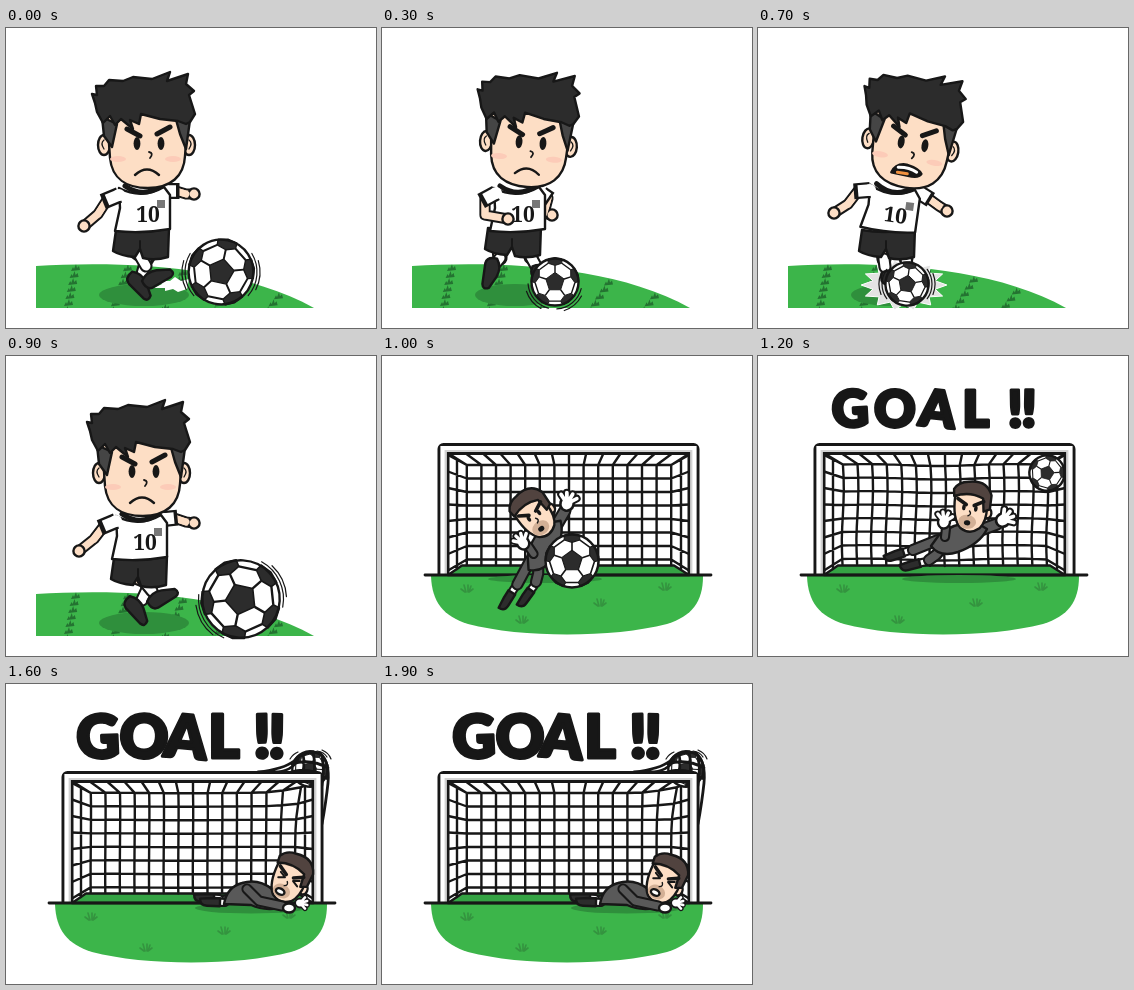
An HTML page for the animation above (2000 ms loop, 370 by 300 pixels).

```html
<!DOCTYPE html>
<html lang="en">
<head>
<meta charset="utf-8">
<title>Goal</title>
<style>
html, body { margin: 0; width: 100%; height: 100%; overflow: hidden; background: #fff; }
svg { display: block; width: 370px; height: 300px; }
.line { fill: none; stroke-linecap: round; stroke-linejoin: round; }
.ink { stroke: #171717; stroke-width: 2.4; stroke-linejoin: round; }
.shirt-number { font: 900 21px "Noto Serif", serif; text-anchor: middle; fill: #171717; }
.shout { font-family: Lato, sans-serif; font-weight: 900; text-anchor: middle; fill: #171717; stroke: #171717; stroke-width: 3; stroke-linejoin: round; }
</style>
</head>
<body>
<svg id="stage" viewBox="0 0 370 300"></svg>
<script>
const INK = '#171717', DARK = '#2c2c2c', SKIN = '#fddec5', GRASS = '#3cb54a', SHADE = '#2f8f3c', SUIT = '#595959';
const stage = document.getElementById('stage');

const mix = (a, b, k) => Object.fromEntries(Object.keys(a).map(key =>
  [key, a[key].map((v, i) => v + (b[key][i] - v) * k)]));
const shape = (d, fill) => `<path class="ink" d="${d}" fill="${fill}"/>`;
const stroke = (d, color = INK, width = 2) => `<path class="line" d="${d}" stroke="${color}" stroke-width="${width}"/>`;
const oval = (x, y, rx, ry, fill, extra = '') => `<ellipse cx="${x}" cy="${y}" rx="${rx}" ry="${ry}" fill="${fill}" ${extra}/>`;
const group = (transform, content) => `<g transform="${transform}">${content}</g>`;
const move = ([x, y, turn = 0], cx, cy) => `translate(${x} ${y}) rotate(${turn} ${cx} ${cy})`;
const place = (x, y, turn, content) => group(`translate(${x} ${y}) rotate(${turn})`, content);
const limb = (points, color, width) => {
  const d = 'M' + points.join(' ');
  return stroke(d, INK, width + 4.2) + stroke(d, color, width);
};
const polar = (r, deg) => [r * Math.cos(deg * Math.PI / 180), r * Math.sin(deg * Math.PI / 180)].map(v => v.toFixed(3)).join(' ');

// ---------- ball ----------
function ball(x, y, r, turn) {
  let black = '', seams = '';
  const core = [];
  for (let a = -90; a < 270; a += 72) {
    core.push(polar(.4, a));
    black += `M${[polar(.69, a), polar(.83, a + 20), polar(1, a + 17), polar(1.02, a), polar(1, a - 17), polar(.83, a - 20)].join('L')}Z`;
    seams += `M${polar(.4, a)}L${polar(.69, a)}M${polar(.83, a + 20)}L${polar(.83, a + 52)}`;
  }
  return group(`translate(${x} ${y}) rotate(${turn}) scale(${r})`,
    `<circle r="1" fill="#fff"/><path d="M${core.join('L')}Z${black}" fill="${DARK}" stroke="${INK}" stroke-width=".04" stroke-linejoin="round"/>
     <path d="${seams}" stroke="${INK}" stroke-width=".06"/><circle r=".98" fill="none" stroke="${INK}" stroke-width="${2.4 / r}"/>`);
}
function whoosh(x, y, r, angles, span = 36) {
  return angles.map(a => [3, 6].map((gap, i) => {
    const part = span - i * 14, R = r + gap;
    return place(x, y, 0, stroke(`M${polar(R, a - part)}A${R} ${R} 0 0 1 ${polar(R, a + part)}`, INK, 1.2));
  }).join('')).join('');
}

// ---------- player ----------
// arms: shoulder, cuff, elbow, hand; legs: hip, sock top, sock end, shoe, shoe angle
const kick = {
  head: [0, 0, 0], shirt: [0, 0, 0], shorts: [0, 0],
  left: [113, 167, 101, 172, 92, 186, 78, 198], right: [160, 163, 170, 163, 180, 166, 188, 166],
  back: [146, 222, 140, 232, 136, 246, 134, 257, 45], front: [122, 218, 133, 226, 140, 238, 151, 249, -30],
  ball: [215, 244, 33, 12], shadow: [138, 267, 45]
};
const follow = {
  head: [-5, 0, 0], shirt: [-3, 0, 0], shorts: [-2, 0],
  left: [110, 165, 98, 170, 88, 183, 73, 195], right: [158, 163, 168, 162, 180, 166, 188, 167],
  back: [142, 222, 142, 231, 136, 244, 131, 254, 47], front: [122, 218, 137, 224, 146, 235, 156, 241, -32],
  ball: [235, 243, 39.5, 48], shadow: [138, 267, 45]
};
const run = {
  head: [6, -1, 4], shirt: [-1, 0, 0], shorts: [-4, -2],
  left: [114, 165, 103, 171, 103, 187, 126, 191], right: [160, 166, 166, 170, 162, 185, 170, 187],
  back: [117, 220, 118, 230, 114, 235, 109, 245, 98], front: [148, 222, 149, 229, 154, 238, 164, 246, 15],
  ball: [173, 254, 24, 0], shadow: [133, 267, 40]
};
const strike = {
  head: [12, 0, 9], shirt: [-4, 0, 8], shorts: [-6, 0],
  left: [112, 162, 100, 163, 90, 176, 76, 185], right: [162, 165, 170, 170, 181, 178, 189, 183],
  back: [125, 222, 126, 231, 127, 239, 138, 251, 10], front: [147, 222, 148, 230, 149, 238, 152, 250, 0],
  ball: [149, 256, 22, 8], shadow: [133, 267, 40]
};
const dribble = [kick, follow, mix(follow, run, .5), run,
  mix(run, strike, .25), mix(run, strike, .5), mix(run, strike, .75), strike];

function arm(p) {
  const [sx, sy, cx, cy, , , hx, hy] = p;
  const cuffEnd = `${cx + (cx - sx) * .35} ${cy + (cy - sy) * .35}`;
  return limb(p.slice(2), SKIN, 7) + oval(hx, hy, 5.6, 5.6, SKIN, 'class="ink"')
    + stroke(`M${p.slice(2, 6).join(' ')}`, SKIN, 7)
    + `<path d="M${sx} ${sy}L${cuffEnd}" stroke="${INK}" stroke-width="16"/>`
    + `<path d="M${sx} ${sy}L${cx} ${cy}" stroke="#fff" stroke-width="11.5"/>` + oval(sx, sy, 6, 6, '#fff');
}
function leg(p) {
  return limb(p.slice(0, 4), SKIN, 11) + limb(p.slice(2, 6), '#fff', 9)
    + place(p[6], p[7], p[8], shape('M-15-4Q-16 6-9 7L12 7Q18 6 15 0L3-6Q-7-10-15-4Z', DARK));
}
function head(pose, shouting) {
  const mouth = shouting
    ? shape('M126 147Q129 137 140 137Q153 139 156 144Q154 149 143 148Z', INK)
      + stroke('M132 141Q143 139 151 143', '#fff', 3) + stroke('M132 146L142 146', '#f0913f', 3)
    : stroke('M129 147Q141 136 153 147', INK, 2.4);
  const ears = [98, 183].map((x, i) => oval(x, 117, 6, 10, SKIN, 'class="ink"')
    + stroke(`M${x} 112q${i ? 4 : -4} 3 0 9`, INK, 1.3)).join('');
  return group(move(pose, 141, 116),
    ears + shape('M101 86L104 130C106 151 121 160 142 160C165 160 178 148 179 128L182 86Z', SKIN)
    + shape('M96 89L98 108L106 119L111 96Z', '#454545') + shape('M169 88L174 106L180 121L184 92Z', '#454545')
    + shape('M97 95L91 84L89 75L86 66L91 67L90 58L98 58L103 52L117 53L127 49L146 51L164 44L161 53L182 46L180 56L188 63L183 67L189 86L184 94L180 96L172 93L154 91L135 86L133 96L124 92L127 101L115 91L109 97L104 88Z', DARK)
    + oval(112, 131, 8, 3, '#fccbb8') + oval(167, 131, 8, 3, '#fccbb8')
    + stroke('M121 101L134 108', INK, 5) + stroke('M151 106L164 99', INK, 5)
    + oval(131, 115.5, 3.4, 6.5, INK) + oval(155, 115.5, 3.4, 6.5, INK)
    + stroke('M143 124q5 1 1 6', INK, 1.8) + mouth);
}
function player(pose, shouting) {
  return arm(pose.right) + leg(pose.back) + leg(pose.front)
    + group(move(pose.shorts, 0, 0), shape('M110 202Q136 207 163 200L162 229Q149 233 137 230L134 221L129 229Q115 228 107 223Z', DARK)
      + stroke('M134 213v8', INK, 2))
    + group(move(pose.shirt, 138, 182),
      shape('M113 160Q136 172 158 159L164 167L164 201Q136 206 109 203L114 180Z', '#fff')
      + stroke('M119 158Q138 171 156 157', INK, 5)
      + `<text class="shirt-number" x="142" y="194">10</text><rect x="151" y="172" width="8" height="8" fill="#777"/>`)
    + arm(pose.left) + head(pose.head, shouting);
}

// ---------- pitch ----------
const hill = 'M30 238C110 233 230 236 308 280H30Z';
function pitch(spread) {
  let tufts = '';
  for (const top of [69, 121, 176, 226, 272]) {
    const x0 = 69 + (top - 69) * spread;
    const slope = .2 + (top - 69) * .0028;
    const y0 = 239 + Math.max(0, (x0 - 110) / 200) ** 2 * 43;
    for (let y = y0; y < 282; y += 7)
      tufts += `M${x0 - slope * (y - y0) - 4} ${y + 4}l2-4 1 2 2-5 1 4 2-2 1 4z`;
  }
  return `<clipPath id="hill"><path d="${hill}"/></clipPath><path d="${hill}" fill="${GRASS}"/>
    <path d="${tufts}" fill="#247331" clip-path="url(#hill)"/>`;
}
function burst() {
  const points = [];
  for (let i = 0; i < 28; i++) {
    const a = i / 28 * Math.PI * 2, r = i % 2 ? .76 : 1.02;
    points.push(`${146 + 42 * r * Math.cos(a)},${257 + 25 * r * Math.sin(a)}`);
  }
  return `<polygon points="${points.join(' ')}" fill="#e3e3e3" stroke="#fff"/>`;
}
function dribbleScene(step) {
  const pose = dribble[step], [x, y, r] = pose.ball, [sx, sy, srx] = pose.shadow;
  const splash = step ? '' : '<path d="M148 260l8-4-3-3 11 0 5-4 6 4 8-2-2 10-9 3-5-3-8 2 0-3z" fill="#fff"/>';
  const arcs = [[175, 5], [150, -25], [150, -25], [140, 50], [140, 50], [140, 50], [140, 50], [0, 180]][step];
  return pitch(1 - .07 * Math.max(0, step - 3) / 4) + oval(sx, sy, srx, 11, SHADE)
    + splash + (step === 7 ? burst() : '') + player(pose, step === 7)
    + whoosh(x, y, r, arcs) + ball(...pose.ball);
}

// ---------- goal ----------
function net(pull, shake) {
  const at = (x, y) => {
    const w = Math.exp(-((x - 300) ** 2 + (y - 100) ** 2) / 600) * pull;
    return `${(x + 8 * w + shake * Math.sin(y / 17)).toFixed(1)} ${(y - 8 * w + shake * Math.sin(x / 23)).toFixed(1)}`;
  };
  const columns = Array.from({ length: 15 }, (_, i) => 187 + (i - 7) * 14.6);
  let d = '';
  for (let i = 0; i < 8; i++) {
    const y = 109 + i * 13.5, front = 99 + i * 16.5;
    d += `M66 ${front}L${columns.map(x => at(x, y)).join('L')}L307 ${front}`;
  }
  for (const x of columns) {
    d += `M${187 + (x - 187) * 1.17} 98`;
    for (let y = 109; y <= 209; y += 12.5) d += 'L' + at(x, y);
  }
  return stroke(d + 'M75 104V213M299 104V213', INK, 2.4);
}
function frame() {
  const d = 'M61.5 219V93H311.5V219';
  return `<path d="${d}" fill="none" stroke-linejoin="round" stroke="${INK}" stroke-width="12"/>
    <path d="${d}" fill="none" stroke="#fff" stroke-width="6.2"/>
    <path d="M63.6 219V95.1H309.4V219" fill="none" stroke="#d2d2d2" stroke-width="2"/>`;
}
const tuft = (x, y) => stroke(`M${x - 6} ${y}l4 3M${x - 3} ${y - 4}l2 7M${x + 1} ${y - 4}v7M${x + 4} ${y - 3}l-2 6M${x + 6} ${y}l-4 3`, '#34933f', 1.6);
function glove(x, y, turn, size) {
  const fingers = [-48, -16, 16, 48].map(a => 'M0 0L' + polar(10, a)).join('');
  return group(`translate(${x} ${y}) rotate(${turn}) scale(${size})`,
    stroke(fingers, INK, 7) + oval(0, 0, 6.5, 6, '#fff', 'class="ink"') + stroke(fingers, '#fff', 3.4));
}
function boot(x, y, turn) {
  return place(x, y, turn, limb([13, 0, 9, 0], '#fff', 5) + shape('M-12-3Q-12 4-5 4L8 4L8-4L0-4Z', DARK));
}
function keeperHead(x, y, turn, down) {
  const face = down
    ? stroke('M-10-2L-4 1L-10 4M11-2L5 1L11 4', INK, 2) + oval(-2, 16, 4.5, 3, '#fff', 'class="ink"')
    : oval(-6, 1, 1.8, 3, INK) + oval(6, 1, 1.8, 3, INK) + oval(-1, 16, 3.2, 2.6, INK);
  return place(x, y, turn,
    oval(18, 4, 4, 5, SKIN, 'class="ink"')
    + shape('M-16-8Q-12-16 11-16L17-2Q18 13 12 20Q3 28-7 22Q-16 14-16-8Z', SKIN)
    + stroke('M-9-11Q0-14 9-11', '#d8b497', 2) + oval(-1, 15, 9, 7, '#d3b096')
    + shape('M-17-9L-18-16Q-14-24-4-25Q14-29 20-14L20 0L14 3L12-10Q-2-16-17-9Z', '#51433f')
    + stroke('M-13-7L-4-2M13-7L4-2', INK, 3.6) + stroke('M0 4q3 3-1 5', INK, 1.4) + face);
}
function divingKeeper() {
  return boot(138, 199, -18) + limb([180, 184, 165, 190, 155, 194], SUIT, 8)
    + boot(154, 209, -14) + limb([184, 192, 178, 199, 171, 204], SUIT, 8)
    + limb([220, 175, 239, 168], SUIT, 9)
    + shape('M173 190L181 179Q198 165 219 167L229 173Q222 188 200 196Q182 202 173 190Z', SUIT)
    + glove(245, 164, -35, 1.1) + keeperHead(212, 151, 7, false)
    + limb([187, 181, 188, 172], SUIT, 6) + glove(186, 166, -80, 1);
}
function fallenKeeper(dip) {
  return limb([228, 214, 216, 217], SUIT, 7) + boot(200, 214, 2) + boot(206, 218, 2)
    + shape('M218 220Q221 203 236 199Q252 194 266 205L284 221Q262 229 245 221Z', SUIT)
    + glove(294, 219, 0, .75)
    + keeperHead(283 - dip, 194 + dip, 26, true)
    + limb([241, 205, 253, 217, 276, 222], SUIT, 7) + oval(283, 224, 6, 4.5, '#fff', 'class="ink"');
}
function keeper(step) {
  if (step > 3) return oval(245, 224, 56, 5.5, SHADE) + fallenKeeper([0, 1, 0, .5][step % 4]);
  const poses = [[-38, 12, -40], [-20, 4, -20], [0, 0, 0], [28, 20, 12]];
  return oval(201 + poses[step][0], 223, 57, 4, SHADE) + group(move(poses[step], 195, 180), divingKeeper());
}
function shout(step) {
  const beat = (step - 2) % 3;
  const xs = beat === 1 ? [92, 138, 180, 218, 256, 271] : [92, 137, 180, 218, 257, 271];
  const size = [51, 60, 55][beat], base = [71, 74, 73][beat], tilt = [1, .8, -.8][beat];
  const turns = [-3, 2, 6, 0, -1, 1];
  return [...'GOAL!!'].map((letter, i) =>
    `<text class="shout" font-size="${size}" x="${xs[i]}" y="${base}" transform="rotate(${turns[i] * tilt} ${xs[i]} ${base - 20})">${letter}</text>`).join('');
}
function caughtBall(step) {
  const jolt = step % 3 ? 1.5 : 0;
  return ball(304 + jolt, 85 + jolt, 18, 20)
    + stroke('M252 88Q278 85 288 77Q299 66 314 69Q324 78 322 99Q320 118 316 140M268 88Q286 88 292 75M286 80Q304 74 322 84M285 88Q304 82 322 95M297 70Q300 83 294 98M307 68Q311 84 305 102M316 72Q320 92 313 112', INK, 2.8)
    + stroke('M284 75q3-5 8-7M311 67q7 1 10 6M316 66q7 3 9 9', INK, 1.2);
}
function goalScene(step) {
  const flight = [[190, 205, 27, 0], [245, 155, 22, 30], [289, 117, 18, 15], [299, 98, 18, 40]];
  const landed = step > 3;
  const shake = [0, 0, 1, -1.2, .8, -.5, .2, -.2, .1, 0][step];
  const flying = landed ? '' : ball(...flight[step]);
  return `<path d="M49 220C50 246 61 260 86 268C140 282 230 282 285 268C310 260 321 246 321 220Z" fill="${GRASS}"/>`
    + [[85, 233], [218, 247], [140, 264], [283, 231]].map(p => tuft(...p)).join('')
    + shape('M66 219L80 209.5H292L307 219Z', '#35a344')
    + net(landed ? 1 : step === 3 ? .6 : 0, shake)
    + (landed ? caughtBall(step) : step > 1 ? flying : '') + frame()
    + stroke('M43 219H329', INK, 2.8) + keeper(step)
    + (step < 2 ? flying : shout(step));
}

// ---------- clock ----------
let shown = -1;
const start = performance.now();
function tick() {
  const step = Math.floor((performance.now() - start) / 100) % 20;
  if (step !== shown) {
    shown = step;
    stage.innerHTML = step < 10 ? dribbleScene(step % 8) : goalScene(step - 10);
  }
  requestAnimationFrame(tick);
}
tick();
</script>
</body>
</html>
```
